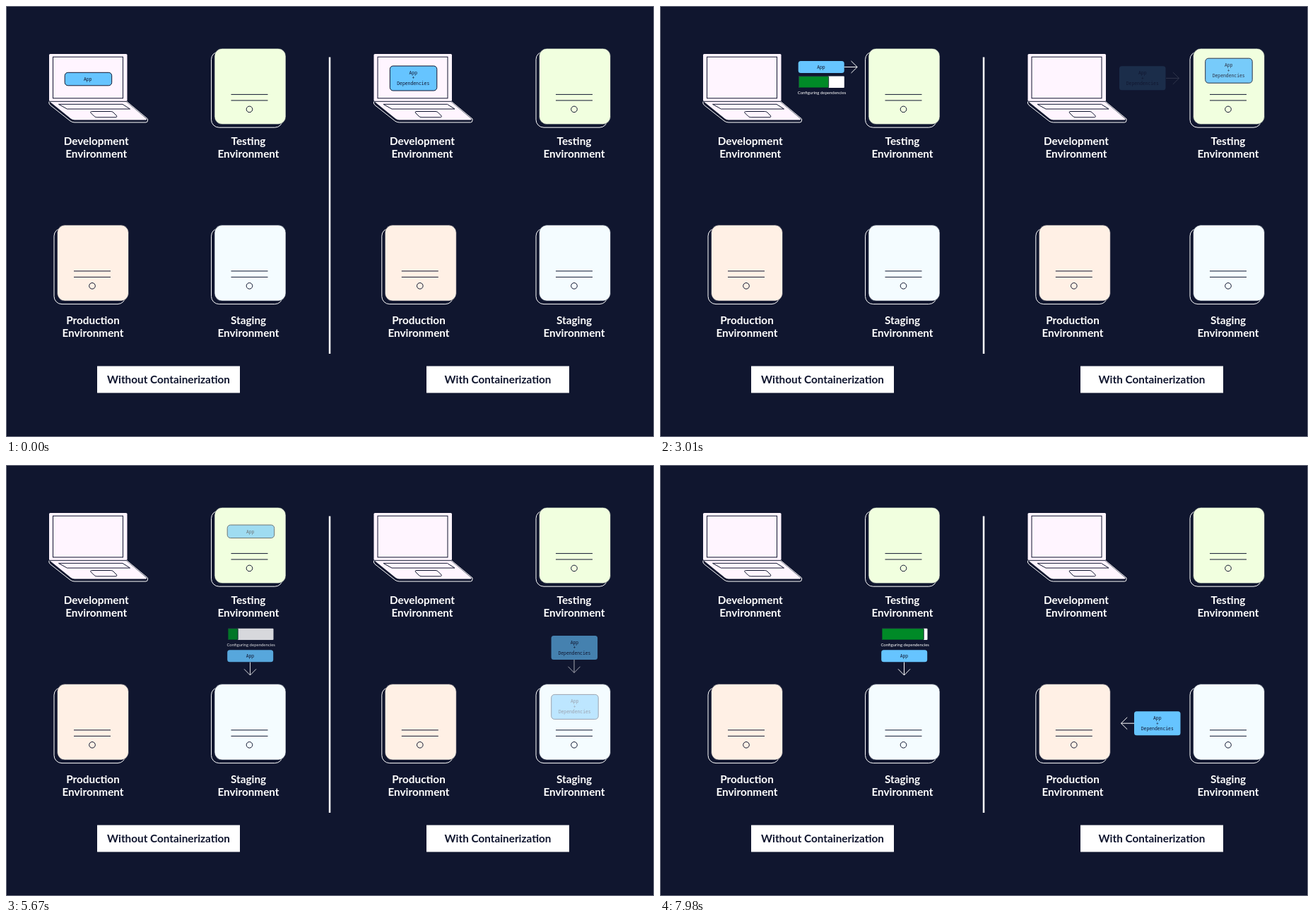
These frames come from a looping animation (917x611 px, 8 s). An HTML page:

```html
<!DOCTYPE html>
<html lang="en">
<head>
<meta charset="utf-8">
<title>Containerization</title>
<style>
  html, body { margin: 0; width: 100%; height: 100%; overflow: hidden; background: #10162f; }
  svg { display: block; width: 917px; height: 611px; }
  text { text-anchor: middle; fill: #fff; }
  .label { font: 700 15.3px Lato, "Open Sans", sans-serif; }
  .note { font: 400 6px Lato, "Open Sans", sans-serif; }
  .mono { font: 400 6.4px "Noto Sans Mono", "DejaVu Sans Mono", monospace; fill: #10162f; }
  .dark { fill: #10162f; }
  .line { fill: none; stroke: #10162f; }
  .white { fill: none; stroke: #fff; }
</style>
</head>
<body>
<svg id="stage" viewBox="0 0 917 611"></svg>
<script>
const NAVY = '#10162f', BLUE = '#66c4ff';
const BAR = { width: 64.5, start: 14.2, time: 2500 };

const text = (x, y, s, cls) => `<text x="${x}" y="${y}" class="${cls}">${s}</text>`;
const rect = (x, y, w, h, r, attrs) =>
  `<rect x="${x}" y="${y}" width="${w}" height="${h}" rx="${r}" ${attrs}/>`;
const path = (d, attrs) => `<path d="${d}" ${attrs}/>`;

const label = (x, y, name) =>
  text(x, y, name, 'label') + text(x, y + 18.4, 'Environment', 'label');

const server = (x, y, color) =>
  rect(x - 4.5, y + 4.5, 101, 107.5, 11, 'class="white"') +
  rect(x, y, 101, 107.5, 11, `fill="${color}" stroke="${NAVY}" stroke-width=".6"`) +
  path(`M${x + 23.5} ${y + 65.2}h52m-52 8.5h52`, 'class="line"') +
  `<circle cx="${x + 49.5}" cy="${y + 86.2}" r="4.3" class="line"/>`;

const laptop = x => `<g transform="translate(${x} 0)">` +
  path('M61 135.5Q60 138 62.5 140.5L91 163Q93.5 165 97 165H198Q200.5 165 200.5 162V160L171 135.5Z',
    `fill="${NAVY}" stroke="#fff"`) +
  path('M62.5 136H170.5L198.5 159.5Q200 161.5 197 161.5H97Q94 161.5 91.5 159.5Z', 'fill="#fff5ff"') +
  rect(61, 68, 110.5, 67, 1.5, 'fill="#fff5ff"') +
  rect(66.5, 72.2, 99, 58.6, 0, 'class="line"') +
  path('M61 135.3H171M74.5 139.3H165L175.5 146H86.5Z', 'class="line"') +
  path('M121.5 149.5H148.5Q150.5 149.5 152 151L156 155Q158 157.8 155 157.8H128.5Q126 157.8 124.5 156L120.5 152Q118.5 149.5 121.5 149.5Z',
    'class="line"') + '</g>';

const appText = (x, y) => text(x, y, 'App', 'mono');
const fullText = (x, y) =>
  appText(x, y) + text(x, y + 7.3, '+', 'mono') + text(x, y + 14.6, 'Dependencies', 'mono');

// Boxes shown on a device have an outline; those on the move do not.
const outlined = `fill="${BLUE}" stroke="${NAVY}"`, plain = `fill="${BLUE}"`;
const appOn = (x, y) => rect(x, y, 66.5, 18.5, 4.5, outlined) + appText(x + 32.5, y + 11.9);
const fullOn = (x, y) => rect(x, y, 66.5, 35, 4.5, outlined) + fullText(x + 33, y + 12);
const appMove = (x, y) => rect(x, y, 65, 17, 3.5, plain) + appText(x + 32.2, y + 11);
const fullMove = (x, y) => rect(x, y, 65.5, 34, 3.5, plain) + fullText(x + 32.8, y + 12);

const arrow = (x, y, turn) =>
  path('M0 0H18.5M9.8-8.5L18.5 0L9.8 8.5', `class="white" transform="translate(${x} ${y}) rotate(${turn})"`);

const bar = (x, y) =>
  rect(x, y, BAR.width, 16.3, 1, 'fill="#fff"') +
  rect(x, y, BAR.start, 16.3, 1, `class="fill" fill="#008a27" stroke="${NAVY}" stroke-width=".8"`) +
  text(x + 32.7, y + 25, 'Configuring dependencies', 'note');

const scene =
  rect(0, 0, 917, 611, 0, `fill="${NAVY}"`) +
  rect(.5, .5, 916, 610, 0, 'class="white" opacity=".4"') +
  rect(456.8, 72.5, 2.5, 420.5, 0, 'fill="#fff"') +
  laptop(0) + laptop(459.5) +
  [295, 754.5].map(x => server(x, 60.2, '#f1ffdf') + server(x, 310.6, '#f4fcff')).join('') +
  [72.5, 536.3].map(x => server(x, 310.6, '#fff0e5')).join('') +
  label(127.7, 196.8, 'Development') + label(589, 196.8, 'Development') +
  label(343, 196.8, 'Testing') + label(804, 196.8, 'Testing') +
  label(123, 451, 'Production') + label(584, 451, 'Production') +
  label(343, 451, 'Staging') + label(804, 451, 'Staging') +
  rect(129, 510.5, 202, 38, 0, 'fill="#fff"') + rect(595, 510.5, 202, 38, 0, 'fill="#fff"') +
  text(230, 535, 'Without Containerization', 'label dark') +
  text(696, 535, 'With Containerization', 'label dark');

// Each part fades in and out over [from, to] in ms.
const ALWAYS = [-2, -1], NEVER = [9e3, 9e3 + 1];
const parts = [
  { art: appOn(83.2, 94.3), in: ALWAYS, out: [1190, 1610] },
  { art: appMove(195.7, 78) + arrow(260.7, 86.5, 0) + bar(196.3, 99.6),
    in: [1190, 1610], out: [4110, 4690], barFrom: 1610 },
  { art: appOn(313.2, 85), in: [4110, 4690], out: [5320, 6160] },
  { art: bar(314, 231.7) + appMove(313.2, 262.2) + arrow(345.5, 279.5, 90),
    in: [5320, 5740], out: NEVER, barFrom: 5740 },
  { art: fullOn(543.3, 85), in: ALWAYS, out: [1190, 1610] },
  { art: fullMove(650, 85.3) + arrow(716, 102.4, 0), in: [1190, 1750], out: [2245, 3125] },
  { art: fullOn(771.7, 74.2), in: [2245, 3125], out: [4110, 4690] },
  { art: fullMove(771.6, 242) + arrow(804, 276, 90), in: [4110, 4690], out: [5320, 6235] },
  { art: fullOn(771.7, 325.4), in: [5320, 6235], out: [7185, 7765] },
  { art: fullMove(671, 349.2) + arrow(671, 366.2, 180), in: [7185, 7765], out: NEVER },
];

const stage = document.getElementById('stage');
stage.innerHTML = scene + parts.map(p => `<g class="part">${p.art}</g>`).join('');
stage.querySelectorAll('.part').forEach((g, i) => {
  parts[i].node = g;
  parts[i].fill = g.querySelector('.fill');
});

const ramp = (t, [from, to]) => Math.min(1, Math.max(0, (t - from) / (to - from)));

function draw(now) {
  const t = Math.floor(now % 8000 / 70) * 70;
  for (const p of parts) {
    p.node.setAttribute('opacity', ramp(t, p.in) * (1 - ramp(t, p.out)));
    if (p.fill) {
      const done = ramp(t, [p.barFrom, p.barFrom + BAR.time]);
      p.fill.setAttribute('width', BAR.start + (BAR.width - BAR.start) * done);
    }
  }
}

const begin = performance.now();
function loop() {
  draw(performance.now() - begin);
  requestAnimationFrame(loop);
}
loop();
</script>
</body>
</html>
```
